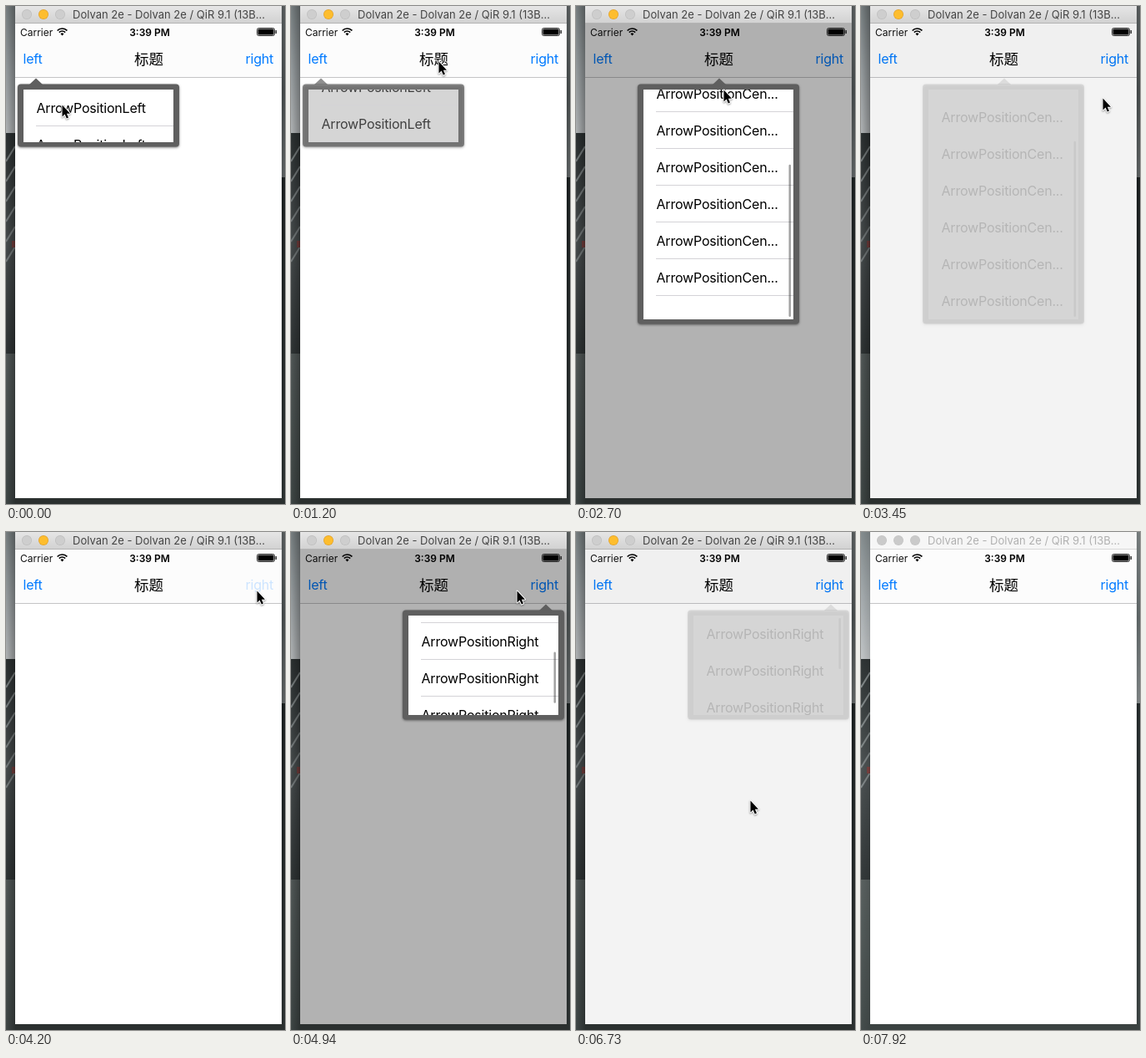
Write an HTML page with a canvas that moves like this. It is 335 by 596 pixels and loops after 8020 ms.

```html
<!DOCTYPE html>
<html lang="en">
<head>
<meta charset="utf-8">
<title>Popover menu demo</title>
<style>
html, body { margin: 0; width: 100%; height: 100%; overflow: hidden; background: #4a5251; }
canvas { display: block; }
</style>
</head>
<body>
<canvas id="stage" width="335" height="596"></canvas>
<script>
const ctx = document.getElementById('stage').getContext('2d');
const LOOP = 8020;
const LAST = 53;
const ROW = 44;
const SANS = 'Inter, sans-serif';
const CJK = '"Noto Sans CJK SC", "Noto Sans CJK", sans-serif';

// Start time of each tick: 150 ms apart, three of them 10 ms shorter.
const starts = [0];
for (let i = 0; i < LAST; i++) {
  starts.push(starts[i] + ([28, 40, 46].includes(i) ? 140 : 150));
}

const menus = [
  { x: 21, h: 63, tip: 36, label: 'ArrowPositionLeft', rows: 3, dim: 0,
    open: 0, bar: [1, 8],
    fade: [[7, 1], [8, .7], [9, .3], [10, 0]],
    scroll: [[0, 0], [1, 14], [2, 38], [3, 60], [4, 69]] },
  { x: 81, h: 275, tip: 172, label: 'ArrowPositionCen...', rows: 8, dim: .3,
    open: 12, bar: [16, 24],
    fade: [[21, 1], [22, .6], [23, .15], [24, 0]],
    scroll: [[15, 0], [16, 40], [17, 84], [18, 105], [19, 94], [20, 83], [22, 77]] },
  { x: 141, h: 119, tip: 306, label: 'ArrowPositionRight', rows: 5, dim: .3,
    open: 29, bar: [31, 46],
    fade: [[43, 1], [44, .6], [45, .15], [46, 0]],
    scroll: [[30, 0], [31, 6], [33, 79], [34, 90], [35, 55], [36, 12], [37, -28],
             [38, -42], [39, -28], [40, -15], [41, -7], [42, -2], [43, 0]] }
];

const pointer = [
  [0, 67, 118], [1, 66, 100], [2, 65, 75], [3, 66, 52], [4, 100, 53], [5, 150, 60],
  [6, 176, 68], [7, 176, 68], [8, 177, 66], [10, 177, 60], [12, 177, 60], [14, 180, 210],
  [15, 180, 234], [18, 177, 100], [19, 180, 97], [21, 284, 130], [23, 290, 110],
  [27, 301, 73], [28, 301, 70], [29, 300, 82], [30, 285, 135], [31, 275, 149],
  [33, 271, 70], [34, 271, 69], [35, 262, 120], [38, 225, 349], [39, 216, 345],
  [41, 207, 312], [43, 202, 302], [46, 212, 330], [49, 304, 585]
];

function at(keys, t, col = 1) {
  if (t <= keys[0][0]) return keys[0][col];
  for (let i = 1; i < keys.length; i++) {
    const a = keys[i - 1], b = keys[i];
    if (t <= b[0]) return a[col] + (b[col] - a[col]) * (t - a[0]) / (b[0] - a[0]);
  }
  return keys[keys.length - 1][col];
}

function rect(x, y, w, h, fill) {
  ctx.fillStyle = fill;
  ctx.fillRect(x, y, w, h);
}

function round(x, y, w, h, r, fill) {
  ctx.fillStyle = fill;
  ctx.beginPath();
  ctx.roundRect(x, y, w, h, r);
  ctx.fill();
}

function disc(x, y, r, fill) {
  ctx.fillStyle = fill;
  ctx.beginPath();
  ctx.arc(x, y, r, 0, Math.PI * 2);
  ctx.fill();
}

function poly(points) {
  ctx.beginPath();
  points.forEach(([x, y]) => ctx.lineTo(x, y));
  ctx.closePath();
}

function text(s, x, y, font, color, spacing = 0, align = 'left') {
  ctx.font = font;
  ctx.letterSpacing = spacing + 'px';
  ctx.textAlign = align;
  ctx.fillStyle = color;
  ctx.fillText(s, x, y);
}

function grad(x0, y0, x1, y1, stops) {
  const g = ctx.createLinearGradient(x0, y0, x1, y1);
  stops.forEach(([p, c]) => g.addColorStop(p, c));
  return g;
}

function desktop(active) {
  rect(0, 0, 335, 596, '#4a5251');
  rect(0, 0, 11, 152, grad(0, 0, 0, 152, [[0, '#8f989a'], [.5, '#b3babd'], [1, '#d3d7d9']]));
  rect(0, 152, 11, 264, grad(0, 152, 0, 416, [[0, '#343a3b'], [.5, '#555b5c'], [1, '#383e3f']]));
  ctx.lineWidth = 2;
  ctx.strokeStyle = '#8d9495';
  for (let y = 168; y < 300; y += 24) {
    ctx.beginPath();
    ctx.moveTo(0, y + 18);
    ctx.lineTo(11, y);
    ctx.stroke();
  }
  rect(7, 281, 4, 8, '#8a4a48');
  rect(0, 416, 11, 180, grad(0, 416, 0, 596, [[0, '#626a69'], [1, '#4b5453']]));
  rect(331, 0, 4, 205, grad(0, 0, 0, 205, [[0, '#929a9b'], [.5, '#747d7e'], [1, '#9aa1a2']]));
  rect(331, 205, 4, 391, grad(0, 205, 0, 596, [[0, '#2d3536'], [1, '#4a5453']]));
  const shade = active ? .42 : .2;
  const dark = `rgba(0,0,0,${shade})`;
  rect(0, 0, 11, 596, grad(0, 0, 11, 0, [[0, `rgba(0,0,0,${shade * .4})`], [1, dark]]));
  rect(331, 0, 4, 596, dark);
  rect(11, 589, 320, 7, dark);
}

function statusBar() {
  text('Carrier', 17, 35.5, '12px ' + SANS, '#111');
  text('3:39 PM', 172.5, 35.5, '600 12px ' + SANS, '#000', 0, 'center');
  ctx.strokeStyle = '#000';
  ctx.lineWidth = 1.7;
  [8, 5].forEach(r => {
    ctx.beginPath();
    ctx.arc(67.5, 35, r, -Math.PI * .76, -Math.PI * .24);
    ctx.stroke();
  });
  ctx.fillStyle = '#000';
  ctx.beginPath();
  ctx.moveTo(67.5, 35.5);
  ctx.arc(67.5, 35, 2.6, -Math.PI * .78, -Math.PI * .22);
  ctx.fill();
  ctx.strokeStyle = '#333';
  ctx.lineWidth = 1;
  ctx.beginPath();
  ctx.roundRect(301.5, 26.5, 21, 9, 2);
  ctx.stroke();
  round(302.5, 27.5, 19, 7, 1, '#000');
  rect(323.5, 29, 1.5, 4, '#333');
}

function screen(pressed) {
  rect(11, 20, 320, 569, '#fff');
  rect(11, 20, 320, 65, '#fcfcfc');
  rect(11, 85, 320, 1, '#c4c4c6');
  statusBar();
  text('left', 20.5, 69, '16px ' + SANS, '#007aff', -.2);
  text('标题', 171.5, 69.5, '17.5px ' + CJK, '#000', 0, 'center');
  text('right', 287.5, 69, '16px ' + SANS, pressed ? '#cce4ff' : '#007aff', -.2);
}

function scrollBar(m, off) {
  const total = m.rows * ROW;
  const max = total - m.h;
  const track = m.h - 6;
  const over = Math.max(0, -off, off - max);
  const size = Math.max(7, track * m.h / total - over);
  const top = off > max ? 103 + track - size : 103 + Math.max(0, off) / total * track;
  round(m.x + 174.5, top, 2.5, size, 1.25, 'rgba(0,0,0,.36)');
}

function menu(m, tick) {
  const alpha = at(m.fade, tick);
  if (tick < m.open || alpha <= 0) return;
  const { x, h, tip } = m;
  ctx.save();
  ctx.globalAlpha = alpha;
  if (m.dim) rect(11, 20, 320, 569, `rgba(0,0,0,${m.dim})`);

  const frame = '#5f5f5f';
  ctx.save();
  ctx.shadowColor = 'rgba(0,0,0,.5)';
  ctx.shadowBlur = 3;
  ctx.shadowOffsetY = 1;
  round(x - 7, 93.5, 194, h + 12, 4, frame);
  ctx.restore();
  poly([[tip - 8, 94], [tip, 86.5], [tip + 8, 94]]);
  ctx.fillStyle = frame;
  ctx.fill();

  rect(x, 100, 180, h, '#fff');
  ctx.beginPath();
  ctx.rect(x, 100, 180, h);
  ctx.clip();
  const off = Math.round(at(m.scroll, tick));
  for (let i = 0; i < m.rows; i++) {
    const y = 100 + i * ROW - off;
    text(m.label, x + 15.5, y + 27.5, '16px ' + SANS, '#000', -.2);
    rect(x + 15, y + 43, 165, 1, '#d4d3d7');
  }
  if (tick >= m.bar[0] && tick < m.bar[1]) scrollBar(m, off);
  ctx.restore();
}

function titleBar(active) {
  rect(11, 0, 320, 20, active
    ? grad(0, 0, 0, 20, [[0, '#e6e6e6'], [1, '#d2d2d2']])
    : '#f6f6f6');
  rect(11, 20, 320, 1, active ? '#b4b4b4' : '#d8d8d8');
  [25, 45, 65].forEach(x => {
    const lit = active && x === 45;
    disc(x, 10, 6, lit ? '#e0a02a' : active ? '#bdbdbd' : '#c4c4c4');
    disc(x, 10, 5.3, lit ? '#fdbd2e' : active ? '#cecece' : '#cacaca');
  });
  text('Dolvan 2e - Dolvan 2e / QiR 9.1 (13B...', 80, 15, '13px ' + SANS,
    active ? '#444' : '#b0b0b0');
}

function cursor(tick) {
  if (tick >= 50) return;
  ctx.save();
  ctx.translate(Math.round(at(pointer, tick, 1)), Math.round(at(pointer, tick, 2)));
  poly([[.5, .5], [.5, 14.5], [3.6, 11.6], [5.8, 16.6], [8, 15.6], [5.9, 10.8], [10, 10.8]]);
  ctx.lineJoin = 'round';
  ctx.lineWidth = 2;
  ctx.strokeStyle = '#fff';
  ctx.shadowColor = 'rgba(0,0,0,.4)';
  ctx.shadowBlur = 2;
  ctx.shadowOffsetY = 1;
  ctx.stroke();
  ctx.shadowColor = 'transparent';
  ctx.fillStyle = '#000';
  ctx.fill();
  ctx.restore();
}

function draw(ms) {
  let tick = LAST;
  while (starts[tick] > ms) tick--;
  const active = tick < LAST;
  desktop(active);
  screen(tick === 28);
  menus.forEach(m => menu(m, tick));
  titleBar(active);
  cursor(tick);
}

const begin = performance.now();
function loop() {
  draw((performance.now() - begin) % LOOP);
  requestAnimationFrame(loop);
}
loop();
</script>
</body>
</html>
```
